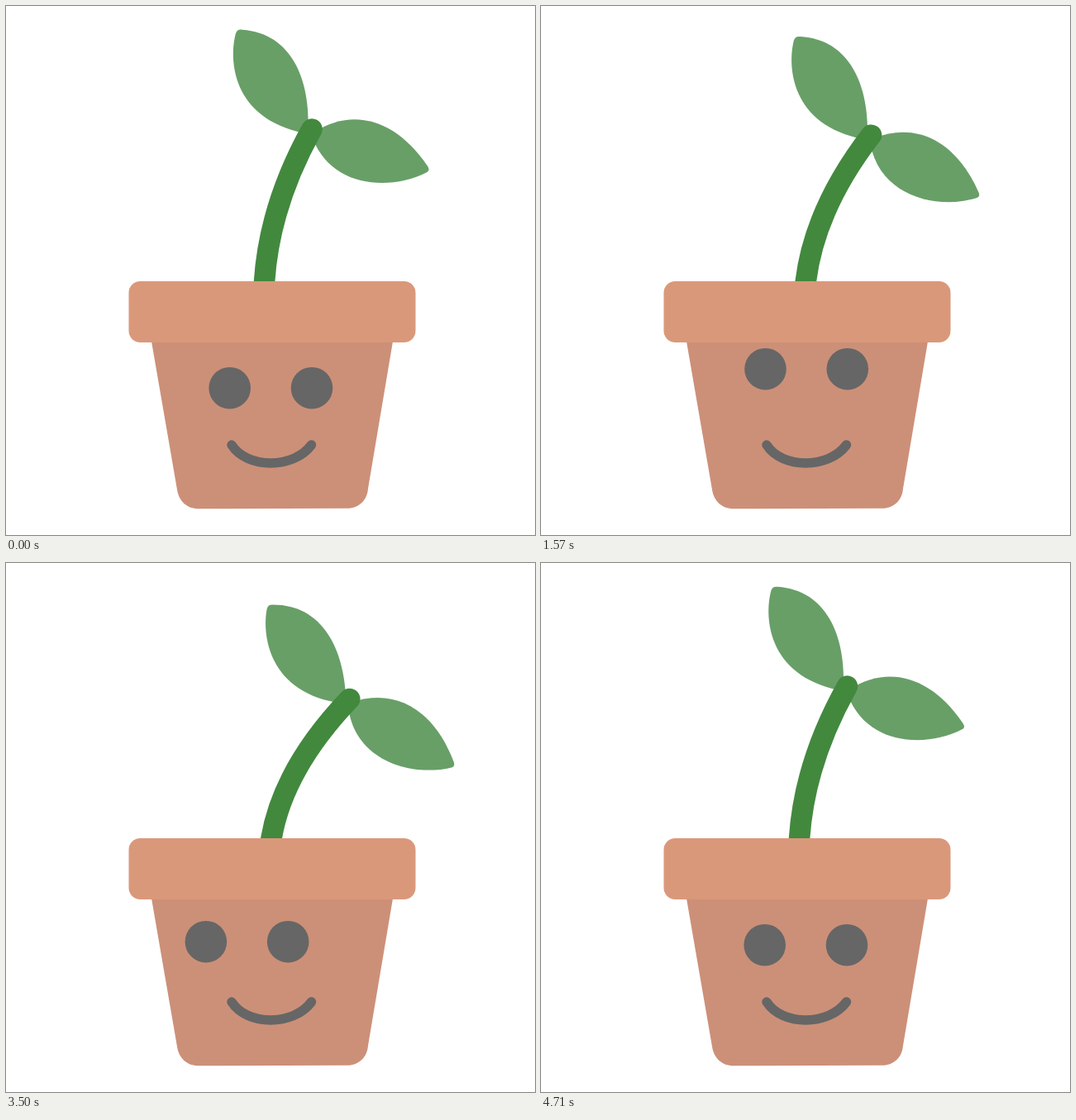
These frames come from a looping animation (640x640 px, 4780 ms). An HTML page:

```html
<!DOCTYPE html>
<html lang="en">
<head>
<meta charset="utf-8">
<title>Swaying sprout</title>
<style>
  html, body { margin: 0; width: 100%; height: 100%; overflow: hidden; background: #fff; }
  svg { display: block; width: 100%; height: 100%; }
  .leaf { fill: #689f67; }
  .stem { fill: none; stroke: #42893e; stroke-width: 25.6; stroke-linecap: round; }
  .line { fill: none; stroke: #666; stroke-linecap: round; stroke-linejoin: round; }
</style>
</head>
<body>
<svg viewBox="0 0 640 640">
  <path id="leafL" class="leaf" d="M365.5 154C369 88 345 33 286 28.7C282 28 279.5 29 278 33C270 62 271 136 362 154Z"/>
  <path id="leafR" class="leaf" d="M374 152C420 123 472 137 510.5 194.5C512.3 198 511.7 199.5 509 201.2C464 224 394 220 371 160Z"/>
  <path id="stem" class="stem"/>
  <path fill="#cc9078" d="M175 400L207 585C209 599 219 608.3 233 608.3L413 607.8C427 607.5 437 598 438 584L469 400Z"/>
  <rect x="148.5" y="333" width="347" height="74" rx="14" fill="#da987b"/>
  <g id="eyes" fill="#666">
    <circle cx="270.7" cy="462.2" r="25.3"/>
    <circle cx="370" cy="462.2" r="25.3"/>
  </g>
  <g id="squint" class="line" stroke-width="5.4">
    <path id="wink" d="M248.5 458Q270 452 290.5 462.3Q281 463 276.5 469.5"/>
    <use href="#wink" transform="matrix(-1 0 0 1 641 0)"/>
  </g>
  <path class="line" stroke-width="11.5" d="M273 531C291.5 560.3 348 560.3 369.5 531"/>
</svg>
<script>
  const LOOP = 4780, STEP = LOOP / 67;
  const el = id => document.getElementById(id);
  const ease = p => (1 - Math.cos(Math.PI * p)) / 2;

  // One part of a pose at time t, eased from pose to pose.
  function at(times, poses, part, t) {
    const i = times.findIndex(k => k > t);
    if (i < 1) return poses[i < 0 ? poses.length - 1 : 0][part];
    const a = poses[i - 1][part], b = poses[i][part];
    return a + (b - a) * ease((t - times[i - 1]) / (times[i] - times[i - 1]));
  }

  // The plant bends twice; root and leaves run slightly ahead of the tip.
  const rest = { x: 370, y: 149, root: 312.6, left: 0, right: 0 };
  const half = { x: 391, y: 152.4, root: 319.9, left: 0.4, right: 9 };
  const bent = { x: 423.3, y: 167, root: 325.2, left: -5, right: 18 };
  const rate = { x: 0.994, y: 0.994, root: 1.065, left: 1.01, right: 1.04 };
  const bends = [rest, bent, half, bent, rest], bendTimes = [0, 1100, 1800, 3050, LOOP];

  const ahead = { x: 0, y: 0 }, up = { x: 0.8, y: -23 }, side = { x: -28.8, y: -4 };
  const looks = [ahead, up, up, side, side, ahead];
  const lookTimes = [480, 1080, 2240, 2800, 3550, 3950];

  function draw(t) {
    const bend = part => at(bendTimes, bends, part, t * rate[part]);
    const look = part => at(lookTimes, looks, part, t);
    const x = bend("x"), y = bend("y"), root = bend("root");

    const lean = 0.22 * (x - root) - 6.5, cy = (333 + y) / 2;
    const under = lean / (333 - cy) * 24;
    el("stem").setAttribute("d",
      `M${root - under} 357L${root} 333Q${root + lean} ${cy} ${x} ${y}`);

    const place = (id, turn) => el(id).setAttribute("transform",
      `translate(${x} ${y}) rotate(${turn}) translate(${-rest.x} ${-rest.y})`);
    place("leafL", bend("left"));
    place("leafR", bend("right"));

    const shut = t >= 3950 && t < 4500;
    el("eyes").style.display = shut ? "none" : "";
    el("squint").style.display = shut ? "" : "none";
    el("eyes").setAttribute("transform", `translate(${look("x")} ${look("y")})`);
  }

  const start = performance.now();
  function tick() {
    const t = (performance.now() - start) % LOOP;
    draw(Math.min(66, Math.floor(t / STEP + 0.05)) * STEP);
    requestAnimationFrame(tick);
  }
  tick();
</script>
</body>
</html>
```
